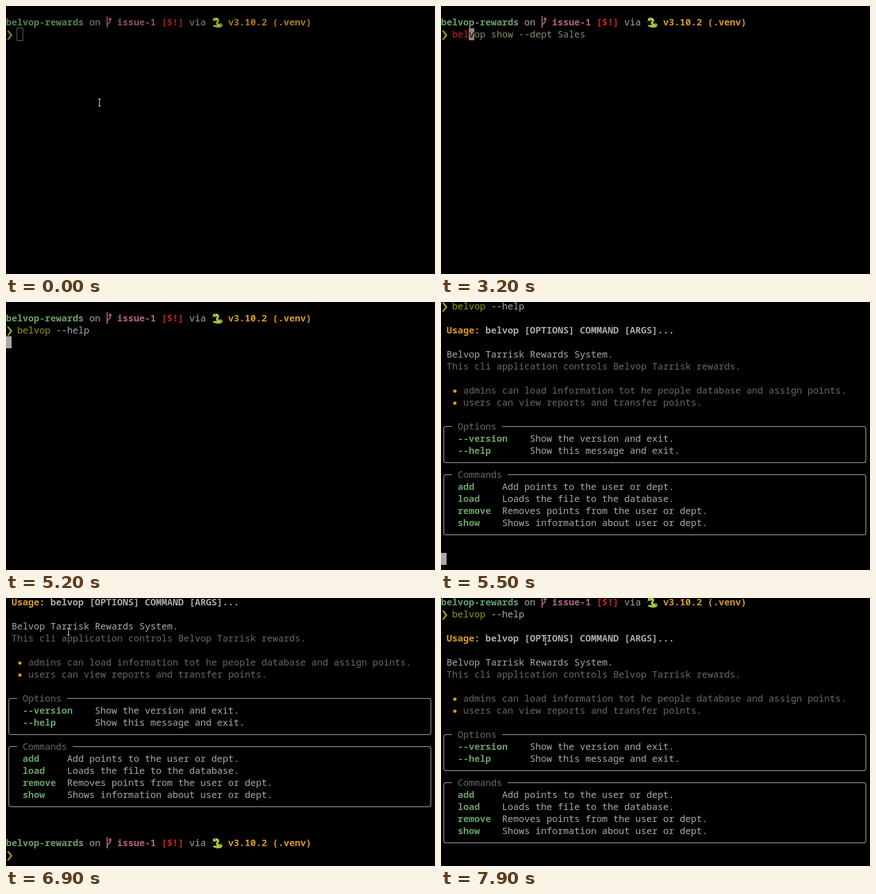
These frames come from a looping animation (927 by 579 pixels, 8000 ms). An HTML page with a canvas:

```html
<!DOCTYPE html>
<html lang="en">
<head>
<meta charset="utf-8">
<title>Terminal help session</title>
<style>
html, body { margin: 0; width: 100%; height: 100%; overflow: hidden; background: #000; }
canvas { display: block; }
</style>
</head>
<body>
<canvas id="stage" width="927" height="579"></canvas>
<script>
const ctx = document.getElementById('stage').getContext('2d');
const CELL = 12, ROW = 26, LOOP = 8000;
const GREY = '#a9a9a9', DIM = '#686868', GREEN = '#689d6a', GOLD = '#d79921',
      OLIVE = '#98971a', PINK = '#b16286', RED = '#cc241d', HINT = '#928374', LINE = '#7c7c7c';

// Each step: time, typed text, suggested rest
const COMMAND = 'belvop', FULL = COMMAND + ' --help', LONG = COMMAND + ' show --dept Sales';
const KEYS = [
  ...[3000, 3100, 3200, 3300, 3400, 3600, 3800].map((time, i) => [time, LONG.slice(0, i + 1), LONG.slice(i + 1)]),
  [3900, COMMAND + ' -', '-help'],
  [4100, COMMAND + ' --', ''],
  [4700, COMMAND + ' --h', 'elp'],
  [4800, FULL, '']
];

// Number of the text line shown in the first row
const SCROLL = [[0, -1], [5500, 1], [5600, 3], [7300, 1], [7400, 0]];

// Pointer positions; null hides it
const POINTER = [
  [0, 202, 208], [200, 202, 207], [3000, null], [6500, 204, 196], [6600, 211, 160],
  [6700, 190, 112], [6800, 155, 82], [6900, 135, 72], [7800, 185, 82], [7900, 226, 93]
];

const latest = (steps, t) => steps.filter(step => step[0] <= t).pop();
let firstLine = 0;
const rowY = line => -4 + ROW * (line - firstLine);

function text(line, col, str, color, bold) {
  ctx.font = `${bold ? 700 : 400} 20px "Noto Sans Mono", monospace`;
  ctx.fillStyle = color;
  ctx.fillText(str, col * CELL, rowY(line) + 20);
}

function stroke(path, color, width) {
  ctx.strokeStyle = color;
  ctx.lineWidth = width;
  ctx.stroke(new Path2D(path));
}

function fill(path, color) {
  ctx.fillStyle = color;
  ctx.fill(new Path2D(path));
}

function at(x, y, draw) {
  ctx.save();
  ctx.translate(x, y);
  draw();
  ctx.restore();
}

function snake() {
  ctx.lineCap = ctx.lineJoin = 'round';
  stroke('M3 9 L0 12', '#d8352b', 1.2);
  stroke('M5 20 C10 23 20 23 21 19 C22 15 16 16 12 18', '#6f9c28', 4);
  stroke('M6 6 C13 3 15 7 12 11 C9 15 13 18 18 20', '#a6c83c', 4.5);
  stroke('M4 20 C8 19 10 21 14 21', '#b4d24a', 3);
  stroke('M5 6 L9 5', '#b4d24a', 6);
  fill('M6 4h2v2h-2z', '#333');
}

function prompt(line) {
  text(line, 0, 'belvop-rewards', GREEN, true);
  text(line, 15, 'on', GREY);
  text(line, 20, 'issue-1', PINK, true);
  text(line, 28, '[$!]', RED, true);
  text(line, 33, 'via', GREY);
  text(line, 40, 'v3.10.2 (.venv)', GOLD, true);
  at(216, rowY(line), () => {
    stroke('M2.5 0 V25 M2.5 19 L9 12 V5', PINK, 2.4);
    fill('M9 2 L13 8 H5 Z', PINK);
  });
  at(445, rowY(line) + 1, snake);
}

function chevron(line) {
  at(0, rowY(line), () => fill('M2 5 H6 L14 15 L6 25 H2 L9 15 Z', OLIVE));
}

function block(line, col, color = GREY) {
  ctx.fillStyle = color;
  ctx.fillRect(col * CELL, rowY(line), CELL, ROW);
}

function bullet(line, str) {
  ctx.fillStyle = GOLD;
  ctx.beginPath();
  ctx.arc(30, rowY(line) + 14.5, 3.6, 0, 7);
  ctx.fill();
  text(line, 4, str, DIM);
}

function panel(line, title, descCol, entries) {
  const height = ROW * (entries.length + 1);
  at(6, rowY(line) + 13, () => stroke(
    `M18 0 H5 Q0 0 0 5 V${height - 5} Q0 ${height} 5 ${height} H907 Q912 ${height} 912 ${height - 5}
     V5 Q912 0 907 0 H${(title.length + 4) * CELL - 6}`, LINE, 2));
  text(line, 3, title, DIM);
  entries.forEach(([name, desc], i) => {
    text(line + i + 1, 3, name, GREEN, true);
    text(line + i + 1, descCol, desc, GREY);
  });
}

function help() {
  text(3, 1, 'Usage:', GOLD, true);
  text(3, 8, COMMAND + ' [OPTIONS] COMMAND [ARGS]...', GREY, true);
  text(5, 1, 'Belvop Tarrisk Rewards System.', GREY);
  text(6, 1, 'This cli application controls Belvop Tarrisk rewards.', DIM);
  bullet(8, 'admins can load information tot he people database and assign points.');
  bullet(9, 'users can view reports and transfer points.');
  panel(11, 'Options', 16, [
    ['--version', 'Show the version and exit.'],
    ['--help', 'Show this message and exit.']
  ]);
  panel(15, 'Commands', 11, [
    ['add', 'Add points to the user or dept.'],
    ['load', 'Loads the file to the database.'],
    ['remove', 'Removes points from the user or dept.'],
    ['show', 'Shows information about user or dept.']
  ]);
}

function commandLine(t) {
  chevron(1);
  const [, typed, hint] = latest(KEYS, t) || [0, '', ''];
  const end = 2 + typed.length;
  const valid = typed.length >= COMMAND.length;
  text(1, 2, typed.slice(0, COMMAND.length), valid ? OLIVE : RED);
  text(1, 2 + COMMAND.length, typed.slice(COMMAND.length), GREY);
  text(1, end, hint, HINT);
  if (t < 2200) {
    at(23, rowY(1) - 1, () => stroke('M.5 .5 H13.5 V27.5 H.5 Z', GREY, 1));
  } else if (t < 5200 && !(t >= 2800 && t < 3000)) {
    block(1, end, hint ? HINT : GREY);
    text(1, end, hint.slice(0, 1), '#000');
  }
}

function pointer(t) {
  const [, x, y] = latest(POINTER, t);
  if (x === null) return;
  const beam = 'M-2.5 -7.5 H2.5 M0 -7.5 V7.5 M-2.5 7.5 H2.5';
  at(x, y + .5, () => {
    stroke(beam, '#000', 3);
    stroke(beam, '#e8e8e8', 1.3);
  });
}

function draw(t) {
  ctx.globalAlpha = 1;
  ctx.fillStyle = '#000';
  ctx.fillRect(0, 0, 927, 579);
  firstLine = latest(SCROLL, t)[1];

  ctx.globalAlpha = t < 2200 ? 0.8 : 1; // window out of focus
  prompt(0);
  commandLine(t);
  if (t >= 5200 && t < 5500) block(2, 0);
  if (t >= 5500) help();
  if (t >= 5500 && t < 5600) block(22, 0);
  if (t >= 5600) {
    prompt(23);
    chevron(24);
    if (t < 6300 || (t >= 6600 && t < 6900)) block(24, 2);
  }
  ctx.globalAlpha = 1;
  pointer(t);
}

const start = performance.now();
function tick() {
  draw((performance.now() - start) % LOOP);
  requestAnimationFrame(tick);
}
tick();
</script>
</body>
</html>
```
